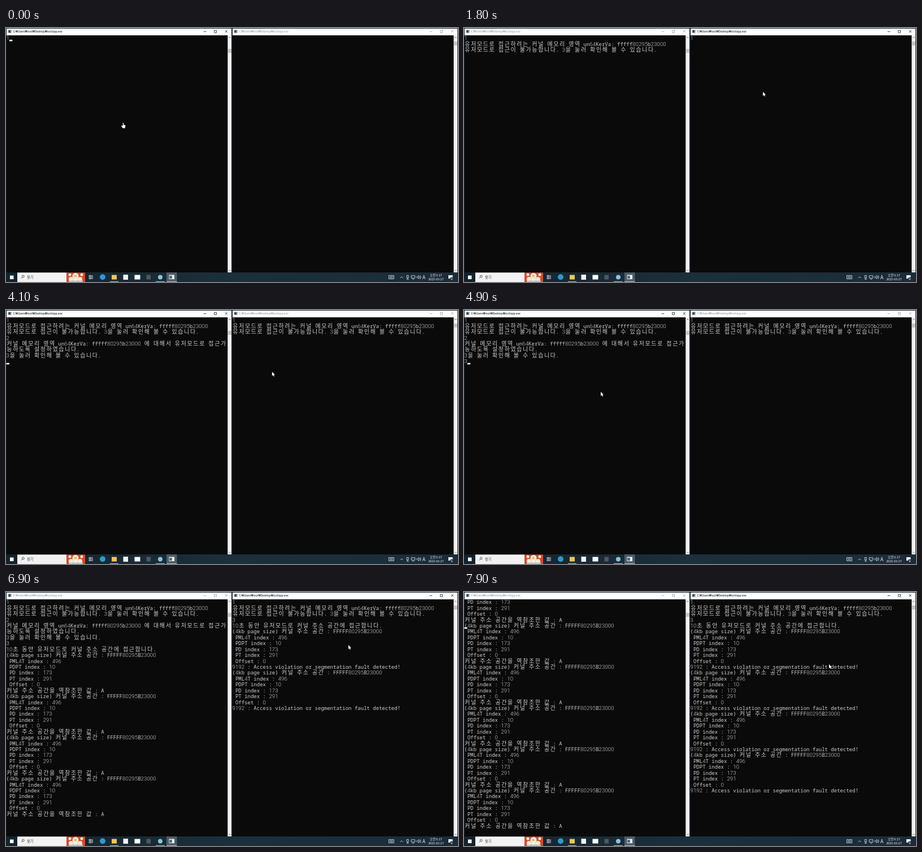
Animation, 800 px wide and 450 px high, one loop 8 s. Source, as an HTML page with a canvas:

```html
<!DOCTYPE html>
<html lang="ko">
<head>
<meta charset="utf-8">
<title>Two consoles</title>
<style>
  html, body { margin: 0; width: 100%; height: 100%; overflow: hidden; background: #0a0a0a; }
  canvas { display: block; width: 100vw; height: 100vh; }
</style>
</head>
<body>
<canvas id="stage" width="800" height="450"></canvas>
<script>
const ctx = document.getElementById('stage').getContext('2d');
const LOOP = 8000, STEP = 100, ROWS = 40;
const CELL = 5.41, LINE = 10.43, TOP = 13;
const MONO = '300 9.02px "Noto Sans Mono", "DejaVu Sans Mono", monospace';
const DIGIT = '300 9.7px Roboto, "Noto Sans", sans-serif';
const HANGUL = '300 10px "Noto Sans Mono CJK KR", "Noto Sans CJK KR", "Noto Sans CJK", sans-serif';
const UI = '"Noto Sans CJK KR", "Noto Sans CJK", "Noto Sans", sans-serif';
const TITLE = 'C:₩Users₩host₩Desktop₩ioctlapp.exe';

// console output
const denied = [
  '유저모드로 접근하려는 커널 메모리 영역 un64KerVa: fffff80295b23000',
  '유저모드로 접근이 불가능합니다. 3을 눌러 확인해 볼 수 있습니다.'
];
const granted = [
  '커널 메모리 영역 un64KerVa: fffff80295b23000 에 대해서 유저모드로 접근가',
  '능하도록 설정하였습니다.',
  '3을 눌러 확인해 볼 수 있습니다.'
];
const begin = ['10초 동안 유저모드로 커널 주소 공간에 접근합니다.'];
const walk = result => [
  '(4kb page size) 커널 주소 공간 : FFFFF80295B23000',
  ' PML4T index : 496', ' PDPT index : 10', ' PD index : 173',
  ' PT index : 291', ' Offset : 0', result
];

const consoles = [
  { x: 0, start: 5100, thumb: 37, block: walk('커널 주소 공간을 역참조한 값 : A'),
    log: [[0, ['1']], [700, denied], [2600, ['2']], [2800, granted], [4800, ['3']], [5100, begin]] },
  { x: 400, start: 6100, thumb: 24, block: walk('9192 : Access violation or segmentation fault detected!'),
    log: [[1800, ['1']], [2000, denied], [5700, ['3']], [6100, begin]] }
];

// time, focused console, caret blink origin
const focus = [[0, 0, -30], [1500, 1, 1250], [2500, 0, 2730], [5500, 1, 5300]];

// time, x, y of the pointer tip
const pointer = [
  [0, 208, 168], [1200, 208, 168], [1600, 529, 113], [2200, 529, 113],
  [2500, 270, 140], [2800, 270, 140], [3200, 551, 97], [3900, 551, 97],
  [4500, 242, 145], [5100, 242, 145], [5500, 606, 94], [7500, 606, 94], [7900, 646, 128]
];

function rect(x, y, w, h, color) {
  ctx.fillStyle = color;
  ctx.fillRect(x, y, w, h);
}
function dot(x, y, r, color) {
  ctx.fillStyle = color;
  ctx.beginPath();
  ctx.arc(x, y, r, 0, 7);
  ctx.fill();
}
function stroke(path, color, width = 0.8) {
  ctx.strokeStyle = color;
  ctx.lineWidth = width;
  ctx.stroke(new Path2D(path));
}
function label(text, x, y, font, color, align = 'left') {
  ctx.font = font;
  ctx.fillStyle = color;
  ctx.textAlign = align;
  ctx.fillText(text, x, y);
}

const isWide = ch => ch >= '가' && ch <= '힣';
const isDigit = ch => ch >= '0' && ch <= '9';

function printLine(text, x, row) {
  const y = TOP + row * LINE + 8.3;
  let col = 0;
  for (const ch of text) {
    const span = isWide(ch) ? 2 : 1;
    const font = isWide(ch) ? HANGUL : isDigit(ch) ? DIGIT : MONO;
    if (ch !== ' ') label(ch, x + (col + span / 2) * CELL, y, font, '#cccccc', 'center');
    col += span;
  }
}

const caret = (x, row, col) => rect(x + col * CELL, TOP + row * LINE + 7.8, 5.4, 2.6, '#f4f4f4');

function drawFrame(x, thumb, active) {
  const ink = active ? '#141414' : '#9a9a9a';
  rect(x, 1, 400, 12, '#ffffff');
  rect(x + 4, 3.2, 5.5, 5.5, '#7d8a90');
  rect(x + 4.7, 4.6, 2.4, 3.4, '#22383a');
  label(TITLE, x + 12.5, 8.2, `5px Roboto, ${UI}`, ink);
  stroke(`M${x + 349.7} 6.5h4.6`, ink);
  stroke(`M${x + 368.7} 4.3h3.9v3.9h-3.9z`, ink);
  stroke(`M${x + 387.8} 4.2l4 4m0-4l-4 4`, ink);
  rect(x + 392.5, 13, 6.5, 420, '#f1f1f1');
  rect(x + 393, thumb, 6, 7, '#c6c6c6');
  stroke(`M${x + 394.3} 17.6l1.7-1.7 1.7 1.7M${x + 394.3} 428.7l1.7 1.7 1.7-1.7`, '#555');
  rect(x + 399, 0, 1, 433, '#1a2a33');
  rect(x, 0, 1, 433, '#141e25');
  rect(x, 0, 400, 1, '#16232c');
}

function drawConsole(c, t, active, blinkOrigin) {
  rect(c.x, 13, 392.5, 420, '#0a0a0a');
  const lines = c.log.filter(([at]) => t >= at).flatMap(([, text]) => text);
  const blocks = Math.max(0, Math.floor((t - c.start) / 500) + 1);
  for (let i = 0; i < blocks; i++) lines.push(...c.block);
  const scroll = Math.max(0, lines.length + 1 - ROWS);
  const left = c.x + 0.5;
  drawFrame(c.x, c.thumb, active);
  lines.slice(scroll).forEach((line, row) => printLine(line, left, row));

  // a stale caret travels along with the scrolled buffer
  if (scroll) caret(left, 16 - scroll, 0);
  const lit = (t - blinkOrigin) % 1060 < 530;
  if (active && lit && t < c.start) {
    const typing = lines.length && lines.at(-1).length === 1;
    caret(left, lines.length - (typing ? 1 : 0), typing ? 1 : 0);
  }
}

function drawTaskbar() {
  const shade = ctx.createLinearGradient(0, 0, 800, 0);
  shade.addColorStop(0, '#13222d');
  shade.addColorStop(0.5, '#1a303c');
  shade.addColorStop(1, '#1a2c3b');
  rect(0, 433, 800, 17, shade);
  rect(7, 438.5, 6.5, 6.5, '#ffffff');

  rect(20, 433.3, 87, 16.7, '#f2f2f2');
  stroke('M27 443.6l2-2.2M32.2 440a1.9 1.9 0 1 1-3.8 0a1.9 1.9 0 1 1 3.8 0', '#333');
  label('찾기', 37, 444, `6.3px ${UI}`, '#444');

  rect(107, 433.3, 33, 16.7, '#d8492c');
  for (const [x, y, r] of [[113, 437, 2.5], [134, 437, 2.5], [123, 439.5, 5.5], [115, 445, 4], [131, 445, 4], [123, 446, 4]])
    dot(x, y, r, '#f7eee0');
  dot(123, 439.5, 2.4, '#f0c050');
  rect(111, 447.5, 25, 2.5, '#a9cdd2');

  stroke('M147 438.5h4v2h-4zM147 442.3h4v2h-4zM153 438v7', '#e8eef1', 0.9);
  dot(171, 441.3, 5, '#2a9bd0');
  rect(187, 437.5, 9, 8, '#f3c64f');
  rect(207.5, 437, 8.5, 9, '#f3f3f3');
  rect(227.5, 437.5, 10, 8, '#ffffff');
  rect(248.5, 437.5, 7.5, 8, '#50585c');
  dot(273, 441.5, 4, '#8dc3dc');
  rect(284, 433, 18.5, 17, '#4b5d68');
  rect(288.5, 437.5, 9.5, 7.5, '#f0f0f0');
  rect(289.3, 439, 4.5, 5, '#4c6670');
  for (const [x, w] of [[184, 15], [265, 16], [284, 18.5]]) rect(x, 448.8, w, 1.2, '#86bfe0');

  const pale = '#e9eef1';
  stroke('M677.5 438.5h9v6h-9zM679 440.5h6M679 442.5h6', pale);
  stroke('M697.8 443l2.4-2.4 2.4 2.4', pale);
  stroke('M709.3 438.5h3v4.2h-3zM710.8 442.7v2.3M709 445h4', pale);
  stroke('M717.3 438.8h6.5v4.3h-6.5zM719 445h3.5', pale);
  stroke('M727 440.5h1.5l2-2v6l-2-2h-1.5zM732 439.5q1.3 2 0 4M733.3 438.3q2 3.2 0 6.4', pale, 0.7);
  label('A', 739.7, 444.6, `8.5px ${UI}`, '#ffffff', 'center');
  label('오전 6:17', 761, 439.6, `5.4px ${UI}`, '#ffffff', 'center');
  label('2025-03-27', 761, 447.4, `5.3px ${UI}`, '#ffffff', 'center');
  rect(783, 438, 7.5, 6, '#ffffff');
  dot(789, 444.5, 3, '#26343d');
  label('4', 789, 446.5, `5px ${UI}`, '#ffffff', 'center');
}

function pointerAt(t) {
  const next = pointer.findIndex(([at]) => at > t);
  if (next < 0) return pointer.at(-1).slice(1);
  const [t0, x0, y0] = pointer[next - 1], [t1, x1, y1] = pointer[next];
  const k = (t - t0) / (t1 - t0), ease = k * k * (3 - 2 * k);
  return [x0 + (x1 - x0) * ease, y0 + (y1 - y0) * ease];
}

function drawPointer(t) {
  const [x, y] = pointerAt(t);
  const shape = t < 1300
    ? 'M-1.2 0h1.2v3.2l3.2 1v3.2l-1 2h-3.4l-2.4-3.2v-1.6l2.4 1z'
    : 'M0 0v7.2l1.7-1.5 1.2 2.6 1.2-.6-1.1-2.4h2.2z';
  ctx.save();
  ctx.translate(x, y);
  stroke(shape, '#000', 0.8);
  ctx.fillStyle = '#ffffff';
  ctx.fill(new Path2D(shape));
  ctx.restore();
}

function render(t) {
  const [, active, blinkOrigin] = focus.filter(([at]) => t >= at).at(-1);
  consoles.forEach((c, i) => drawConsole(c, t, i === active, blinkOrigin));
  drawTaskbar();
  drawPointer(t);
}

let shown = -1;
function tick(now) {
  const t = Math.floor(now % LOOP / STEP) * STEP;
  if (t !== shown) render(shown = t);
  requestAnimationFrame(tick);
}
render(0);
requestAnimationFrame(tick);
</script>
</body>
</html>
```
